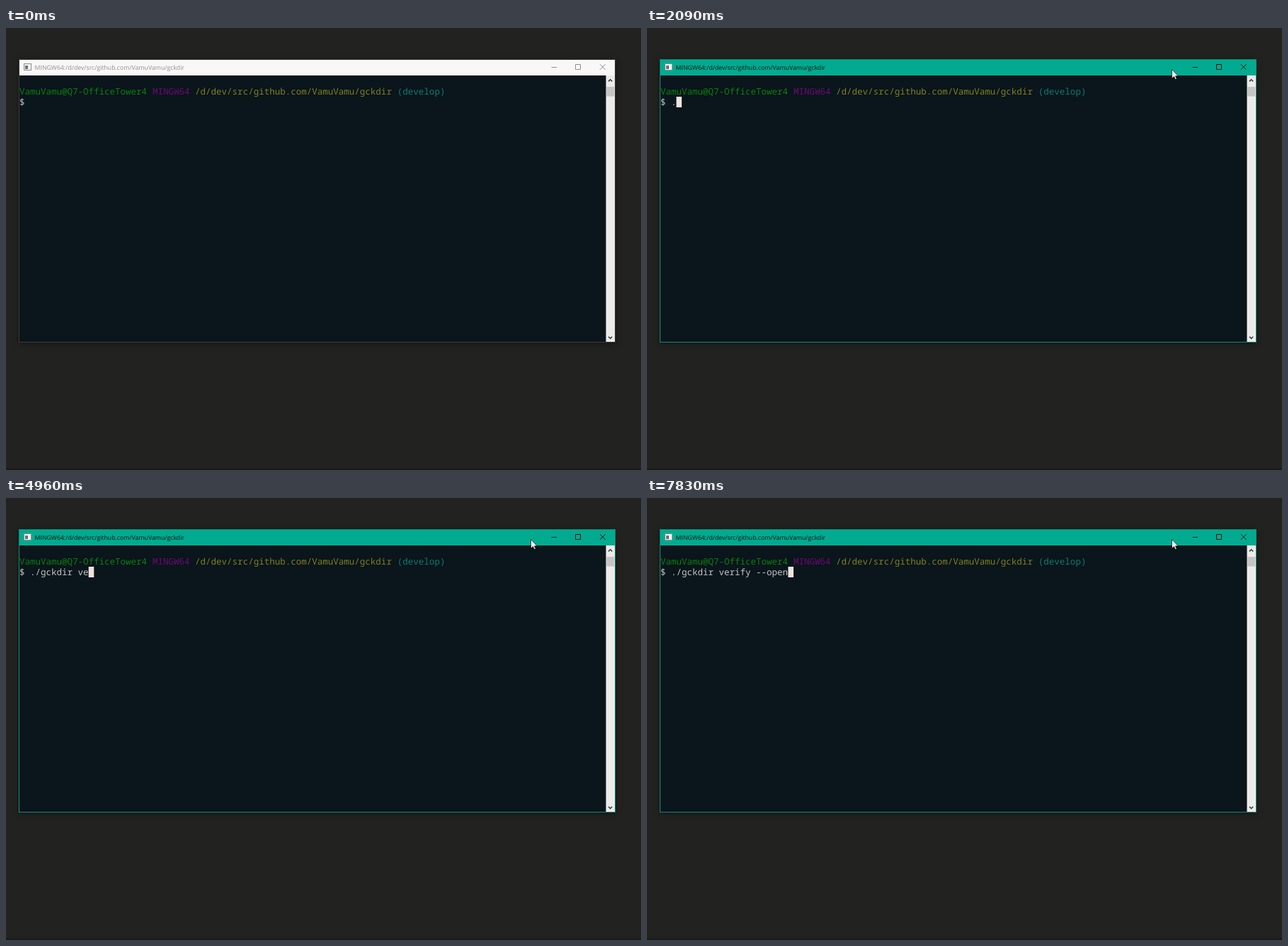
Write an HTML page that moves like this. It is 897 px wide and 624 px high and loops after 8 s.

```html
<!DOCTYPE html>
<html lang="en">
<head>
<meta charset="utf-8">
<title>Terminal</title>
<style>
  html, body { margin: 0; width: 100%; height: 100%; overflow: hidden; background: #222220; }
  svg { display: block; width: 897px; height: 624px; }
  text { white-space: pre; text-rendering: geometricPrecision; }
  .mono { font: 12.53px "Noto Sans Mono", monospace; }
  .shadow { filter: drop-shadow(0 2px 5px rgba(0, 0, 0, .35)); }
  #win { --bar: #faf7f9; --ink: #8f8d8f; --edge: #3b3c3c; }
  #win.active { --bar: #02ab90; --ink: #06110f; --edge: #0a8f7a; }
  .edge { fill: var(--edge); }
  .bar { fill: var(--bar); }
  .title { font: 8.72px "Open Sans", sans-serif; fill: var(--ink); }
  .buttons { fill: none; stroke: var(--ink); }
  .chevrons { fill: none; stroke: #3c3c3c; stroke-width: 1.6; }
</style>
</head>
<body>
<svg viewBox="0 0 897 624">
  <rect y="622" width="897" height="2" fill="#191918"/>
  <g id="win">
    <rect class="edge shadow" x="18" y="44" width="843" height="400"/>
    <rect class="bar" x="19" y="45" width="841" height="22"/>
    <rect x="19" y="67" width="829" height="376" fill="#0a151c"/>

    <g shape-rendering="crispEdges">
      <rect x="25" y="50" width="11" height="10" fill="#8b8f8f"/>
      <rect x="26" y="51" width="9" height="8" fill="#f2f2f2"/>
      <rect x="27" y="53" width="4" height="5" fill="#6c7474"/>
    </g>
    <text class="title" x="40.6" y="58.6">MINGW64:/d/dev/src/github.com/VamuVamu/gckdir</text>
    <path class="buttons" d="M770.5 55.5h7.5M804.5 51.5h7v7h-7zM839 51.2l7.6 7.6M846.6 51.2l-7.6 7.6"/>

    <rect x="847.5" y="67" width="12.5" height="376" fill="#ecebea"/>
    <rect x="848.3" y="83" width="11" height="13.5" fill="#c8c4c3"/>
    <path class="chevrons" d="M851 75.4l2.6-2.6 2.6 2.6M851 435.8l2.6 2.6 2.6-2.6"/>
  </g>
  <g id="prompt" class="mono"></g>
  <text id="cmd" class="mono" y="109" fill="#c6c6c4"></text>
  <rect id="caret" y="97" width="7.6" height="15" fill="#efe2da"/>
  <path id="pointer" d="M0 0V12.4L2.9 9.8 4.9 14 6.7 13.2 4.9 9.2H8.7Z" fill="#fff" stroke="#111" stroke-width=".7"/>
</svg>
<script>
const LOOP = 8000, LEFT = 18.9, CELL = 7.52;
const TICK = 77.6, LEAD = 18;          // the screen refreshes once per tick
const BLINK_START = 13.9, BLINK = 6.8; // in ticks
const COMMAND = './gckdir verify --open';

// Tick of each key press
const KEYS = [27, 29, 34.2, 40, 42, 47.5, 50, 52, 54.5, 63, 64,
  68, 70, 74, 79, 80, 90, 92, 95, 98, 99, 101];

const PROMPT = [
  ['VamuVamu@Q7-OfficeTower4', '#0b800b'],
  ['MINGW64', '#6c0a74'],
  ['/d/dev/src/github.com/VamuVamu/gckdir', '#82801a'],
  ['(develop)', '#0d7c76']
];

const $ = id => document.getElementById(id);
const col = n => LEFT + n * CELL;
const mix = (a, b, p) => a + (b - a) * p;
const flips = n => Math.max(0, Math.floor((n - BLINK_START) / BLINK) + 1);

// A key press shows the caret; every blink then flips it.
function caretShown(n, lastKey) {
  return lastKey ? (flips(n) - flips(lastKey)) % 2 === 0 : flips(n) % 2 === 1;
}

// The pointer slows down towards the title bar, then is nudged right.
function pointerAt(n) {
  const left = 1 - Math.min(1, (n - 1) / 4);
  const p = 1 - left * left;
  return [mix(840, 740, p) + (n >= 12 ? 1.5 : 0), mix(372, 58.6, p)];
}

function drawPrompt() {
  let n = 0;
  for (const [word, color] of PROMPT) {
    const el = document.createElementNS('http://www.w3.org/2000/svg', 'text');
    el.textContent = word;
    el.setAttribute('x', col(n));
    el.setAttribute('y', 94);
    el.setAttribute('fill', color);
    $('prompt').append(el);
    n += word.length + 1;
  }
  $('cmd').setAttribute('x', LEFT);
}

function draw(t) {
  const n = Math.floor((t + LEAD) / TICK);
  const typed = KEYS.filter(k => k <= n).length;
  const [x, y] = pointerAt(n);
  $('win').classList.toggle('active', n >= 7);
  $('cmd').textContent = '$ ' + COMMAND.slice(0, typed);
  $('caret').setAttribute('x', col(2 + typed));
  $('caret').setAttribute('opacity', caretShown(n, KEYS[typed - 1]) ? 1 : 0);
  $('pointer').setAttribute('transform', `translate(${x} ${y})`);
  $('pointer').setAttribute('opacity', n >= 1 ? 1 : 0);
}

drawPrompt();
const start = performance.now();
function tick() {
  draw((performance.now() - start) % LOOP);
  requestAnimationFrame(tick);
}
tick();
</script>
</body>
</html>
```
